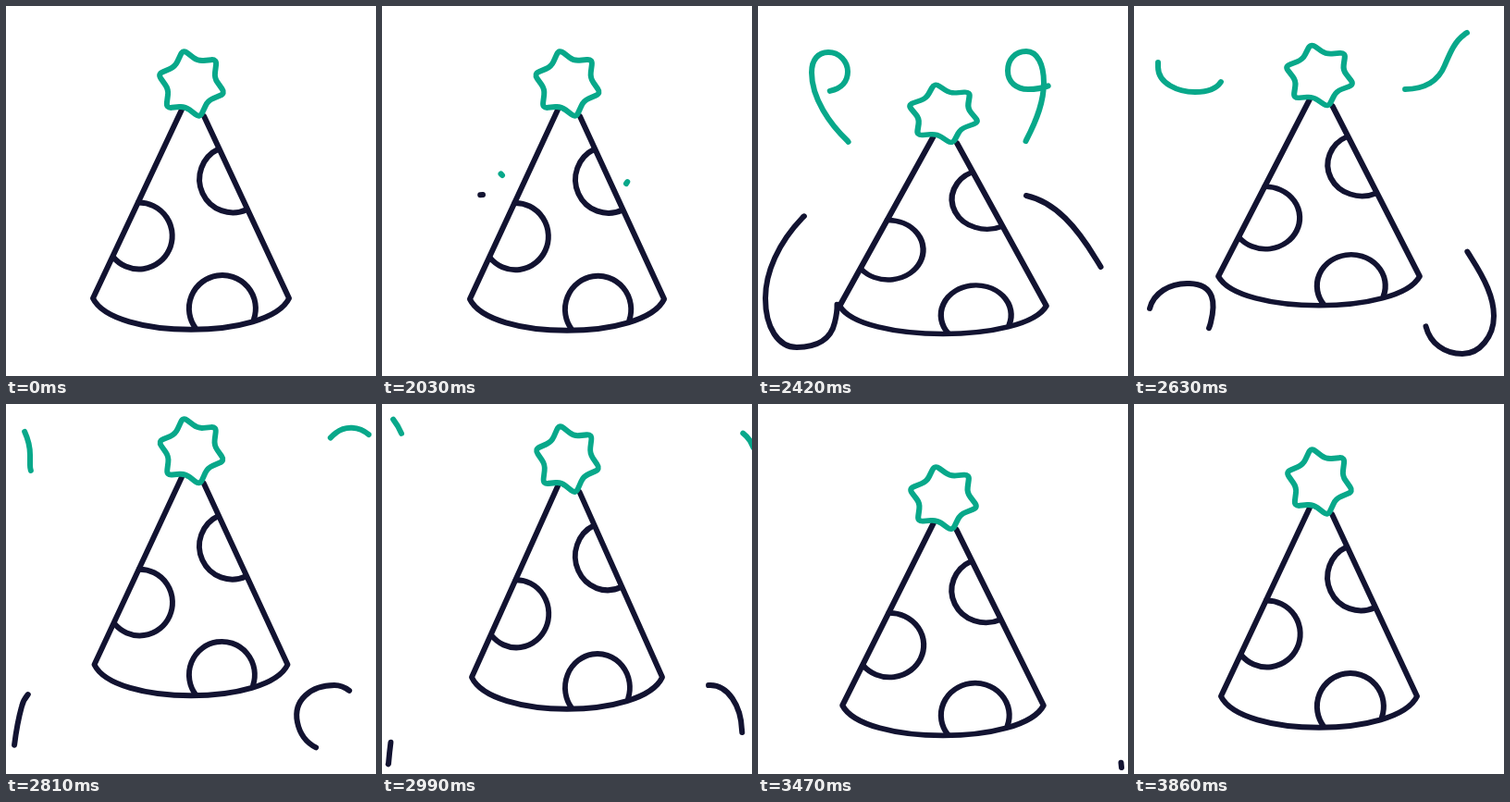
Write an HTML page that moves like this. It is 400 by 400 pixels and loops after 3.89 s.

```html
<!DOCTYPE html>
<html lang="en">
<head>
<meta charset="utf-8">
<title>Party hat</title>
<style>
  html, body { margin: 0; width: 100%; height: 100%; overflow: hidden; background: #fff; }
  svg { display: block; width: 100vw; height: 100vh; }
  path { fill: none; stroke-width: 6; stroke-linecap: round; stroke-linejoin: round; }
  .dark { stroke: #121331; }
  .teal { stroke: #08a88a; }
</style>
</head>
<body>
<svg viewBox="0 0 400 400">
  <g id="streamers"></g>
  <g id="hat">
    <path class="dark" d="M190 112L94 316C116 361 284 361 306 316L214 119"/>
    <path class="dark" d="M143 212.5A36 36 0 1 1 116 271.5"/>
    <path class="dark" d="M230 154.5A36 36 0 0 0 260.5 220"/>
    <path class="dark" d="M205 348.5A36 36 0 1 1 268 338.5"/>
    <path class="teal" id="star"/>
  </g>
</svg>
<script>
const LOOP = 3890, REST = 2030, STEP = 30;
const hat = document.getElementById('hat');
const layer = document.getElementById('streamers');

const clamp = u => Math.max(0, Math.min(1, u));
const smooth = u => u * u * (3 - 2 * u);

// Quick start, long settle: cubic-bezier(.2, 0, .2, 1), solved by bisection.
function settle(x) {
  let lo = 0, hi = 1;
  for (let i = 0; i < 30; i++) {
    const p = (lo + hi) / 2;
    if (0.6 * p * (1 - p) + p ** 3 < x) lo = p; else hi = p;
  }
  return smooth(hi);
}

// Eases between a few poses, each [time, ...values].
function pose(keys, t) {
  const i = Math.max(1, keys.findIndex(k => k[0] >= t));
  const a = keys[i - 1], b = keys[i];
  const u = smooth(clamp((t - a[0]) / (b[0] - a[0])));
  return a.slice(1).map((v, k) => v + (b[k + 1] - v) * u);
}

// A line that runs along its path: head and tail are { start, span } in ms.
function streamer(color, d, head = { start: 2000, span: 1150 }, tail = { start: 2300, span: 1000 }) {
  const el = document.createElementNS('http://www.w3.org/2000/svg', 'path');
  el.setAttribute('class', color);
  el.setAttribute('d', d);
  layer.append(el);
  const total = el.getTotalLength();
  const travel = (run, t) => total * settle(clamp((t - run.start) / run.span));
  return t => {
    const from = travel(tail, t), len = travel(head, t) - from;
    el.style.visibility = t >= REST && len > 0.05 ? 'visible' : 'hidden';
    el.style.strokeDasharray = Math.max(len, 0.05) + ' 9999';
    el.style.strokeDashoffset = -from;
  };
}

const streamers = [
  streamer('teal', `M130 183C118 170 107 159 97 146C78 128 58 100 58 72C58 58 65 50 76 50
    C88 50 97 60 97 71C97 84 87 93 66 93C48 93 26 84 26 66L26 55C26 44 22 28 10 14`),
  streamer('teal', `M264 192C274 177 283 161 290 145C302 122 309 103 309 83C309 63 302 49 290 49
    C278 49 270 58 270 70C270 82 279 90 292 90C310 90 328 84 336 64C342 50 347 38 357 31
    C368 22 388 24 398 40L403 50`),
  streamer('dark', `M109 204C88 206 66 212 48 229C22 256 8 288 8 316C8 348 22 369 42 369
    C64 369 79 360 83 342C88 322 88 301 60 300C38 299 21 311 17 327C12 345 9 365 7 389L4 393`),
  streamer('dark', `M290 205C322 212 345 240 365 273C379 295 389 315 389 335
    C389 357 374 376 355 376C335 376 319 364 315 344C310 320 330 304 355 304
    C374 304 388 326 389 352L393 393`,
    { start: 2220, span: 1200 }, { start: 2450, span: 1200 })
];

// Crouch, jump, land, rise; the squash trails a little behind the lift.
const lift = [[2000, 0], [2380, 22], [2780, -34], [3440, 14], [3860, 0]];
const squash = [[2030, 0.991, 1.004], [2430, 1.054, 0.896], [2950, 0.971, 1.017],
  [3500, 1.026, 0.966], [3860, 1, 1]];

function starPath(cx, cy, outer, inner, turn, round) {
  const corners = Array.from({ length: 12 }, (_, i) => {
    const r = i % 2 ? inner : outer, a = (turn + i * 30) * Math.PI / 180;
    return [cx + r * Math.cos(a), cy + r * Math.sin(a)];
  });
  const toward = (p, q) => p.map((v, k) => v + (q[k] - v) * round);
  return corners.map((p, i) => {
    const a = toward(p, corners[(i + 11) % 12]), b = toward(p, corners[(i + 1) % 12]);
    return `${i ? 'L' : 'M'}${a}Q${p} ${b}`;
  }).join('') + 'Z';
}
document.getElementById('star').setAttribute('d', starPath(200.5, 84, 38, 25.5, -104, 0.3));

function draw(time) {
  const t = time < REST ? 0 : REST + Math.floor((time - REST) / STEP) * STEP;
  const [dy] = t ? pose(lift, t) : [0];
  const [sx, sy] = t ? pose(squash, t) : [1, 1];
  hat.setAttribute('transform',
    `translate(200 ${198.5 + dy}) scale(${sx} ${sy}) translate(-200 -198.5)`);
  streamers.forEach(update => update(t));
}

const start = performance.now();
function tick() {
  draw((performance.now() - start) % LOOP);
  requestAnimationFrame(tick);
}
tick();
</script>
</body>
</html>
```
